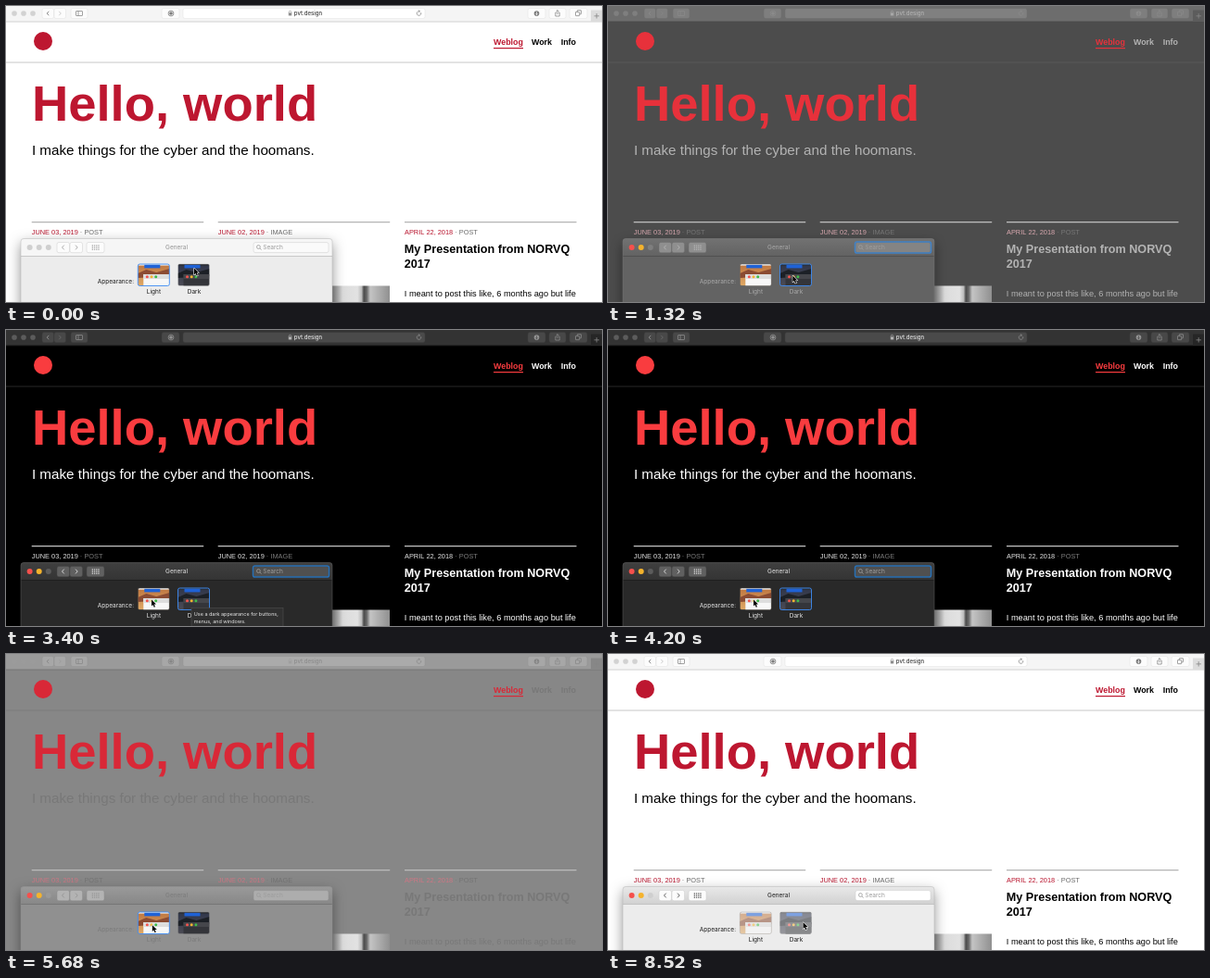
Recreate the animation shown at these times as an HTML page with a canvas. Size 643x320 px, loop 8.56 s.

```html
<!DOCTYPE html>
<html lang="en">
<head>
<meta charset="utf-8">
<title>Light and dark appearance</title>
<style>
html, body { margin: 0; width: 100%; height: 100%; overflow: hidden; background: #fff; }
canvas { display: block; width: 643px; height: 320px; }
</style>
</head>
<body>
<canvas id="stage"></canvas>
<script>
const W = 643, H = 320, LOOP = 8560;
const canvas = document.getElementById('stage');
const ratio = window.devicePixelRatio || 1;
canvas.width = W * ratio;
canvas.height = H * ratio;
const g = canvas.getContext('2d');

const SANS = '"Liberation Sans", Arial, sans-serif';
const UI = 'Inter, Roboto, sans-serif';

let dark = 0; // 0 = light, 1 = dark

const clamp = v => Math.max(0, Math.min(1, v));
const ramp = (t, from, len) => clamp((t - from) / len);
const ease = u => u * u * (3 - 2 * u);
const within = (t, a, b) => t >= a && t < b;

const rgb = hex => [1, 3, 5].map(i => parseInt(hex.slice(i, i + 2), 16));
function mix(a, b) {
  const p = rgb(a), q = rgb(b);
  return `rgb(${p.map((v, i) => Math.round(v + (q[i] - v) * dark)).join(',')})`;
}

function rect(x, y, w, h, fill) {
  g.fillStyle = fill;
  g.fillRect(x, y, w, h);
}
function round(x, y, w, h, r, fill, line, lw = 0.5) {
  g.beginPath();
  g.roundRect(x, y, w, h, r);
  if (fill) { g.fillStyle = fill; g.fill(); }
  if (line) { g.strokeStyle = line; g.lineWidth = lw; g.stroke(); }
}
function disc(x, y, r, fill) {
  g.fillStyle = fill;
  g.beginPath();
  g.arc(x, y, r, 0, 7);
  g.fill();
}
function ring(x, y, r, color) {
  g.strokeStyle = color;
  g.lineWidth = 0.8;
  g.beginPath();
  g.arc(x, y, r, 0, 7);
  g.stroke();
}
function path(color, lw, ...pts) {
  g.strokeStyle = color;
  g.lineWidth = lw;
  g.beginPath();
  for (let i = 0; i < pts.length; i += 2) g.lineTo(pts[i], pts[i + 1]);
  g.stroke();
}
function text(str, x, y, size, fill, weight = 400, font = SANS, align = 'left') {
  g.font = `${weight} ${size}px ${font}`;
  g.textAlign = align;
  g.fillStyle = fill;
  g.fillText(str, x, y);
}
function vertical(y0, y1, a, b) {
  const fill = g.createLinearGradient(0, y0, 0, y1);
  fill.addColorStop(0, a);
  fill.addColorStop(1, b);
  return fill;
}

function toolbar() {
  const icon = mix('#7c7c7c', '#929292');
  const face = mix('#fcfcfc', '#484848');
  const edge = mix('#e0e0e0', '#3c3c3c');
  rect(0, 0, W, 17, mix('#f5f5f5', '#333333'));
  rect(0, 16.5, W, 1, mix('#d2d2d2', '#111111'));
  for (const x of [9, 19, 29]) disc(x, 8, 2.8, mix('#d2d2d2', '#5c5c5c'));
  for (const [x, w] of [[39, 12.5], [52, 12.5], [70, 18], [168, 19], [563, 19], [586, 18], [608, 19]])
    round(x, 2.5, w, 11, 2, face, edge);
  path(icon, 0.9, 46.3, 5.8, 44.2, 8, 46.3, 10.2);
  path(mix('#c8c8c8', '#686868'), 0.9, 57.2, 5.8, 59.3, 8, 57.2, 10.2);
  round(75.5, 5.5, 7, 5, 0.5, null, icon, 0.7);
  path(icon, 0.7, 78, 5.5, 78, 10.5);
  ring(178, 8, 2.9, icon);
  disc(178, 8, 1.8, icon);

  round(191, 2.5, 261, 11, 2, mix('#ffffff', '#4a4a4a'), edge);
  const lock = mix('#8c8c8c', '#b4b4b4');
  rect(304.8, 7.4, 3.4, 3, lock);
  round(305.3, 5.3, 2.4, 3.5, 1.2, null, lock, 0.6);
  text('pvt.design', 310.8, 10.4, 6, mix('#3c3c3c', '#e4e4e4'), 500, UI);
  g.strokeStyle = icon;
  g.lineWidth = 0.7;
  g.beginPath();
  g.arc(445.5, 8, 2.3, -0.4, 4.9);
  g.stroke();
  path(icon, 0.7, 445, 4.6, 446.7, 5.7, 445.2, 7);

  disc(572.5, 8, 2.8, icon);
  path(face, 0.7, 572.5, 6.3, 572.5, 9.6);
  path(face, 0.7, 571.3, 8.4, 572.5, 9.6, 573.7, 8.4);
  path(icon, 0.7, 593.8, 7, 592.8, 7, 592.8, 11, 597.2, 11, 597.2, 7, 596.2, 7);
  path(icon, 0.7, 595, 9, 595, 4.5);
  path(icon, 0.7, 593.7, 5.8, 595, 4.5, 596.3, 5.8);
  round(616.3, 4.6, 4.2, 4.2, 0.4, null, icon, 0.7);
  round(614.5, 6.4, 4.2, 4.2, 0.4, face, icon, 0.7);
  rect(631, 4.5, 12, 12.5, mix('#dcdcdc', '#262626'));
  path(icon, 0.7, 634.5, 10.8, 640, 10.8);
  path(icon, 0.7, 637.2, 8, 637.2, 13.5);
}

function meta(x, date, kind) {
  rect(x, 233, 185.5, 1.3, mix('#b6b6b6', '#bebebe'));
  text(date, x, 246.5, 7.4, mix('#b9162f', '#e4e4e4'));
  const end = x + g.measureText(date + ' ').width;
  text('· ' + kind, end, 246.5, 7.4, mix('#6c6c6c', '#7c7c7c'));
}

function photo() {
  const tones = g.createLinearGradient(352, 0, 414, 0);
  const stops = [[0, '#8c8c8c'], [0.12, '#bcbcbc'], [0.18, '#dcdcdc'], [0.44, '#e2e2e2'],
    [0.51, '#bcbcbc'], [0.55, '#4a4a4a'], [0.6, '#686868'], [0.66, '#c4c4c4'], [1, '#909090']];
  for (const [at, tone] of stops) tones.addColorStop(at, tone);
  rect(229, 302.5, 185, 18, tones);
}

function page() {
  const ink = mix('#000000', '#ffffff');
  const red = mix('#bd1730', '#f93c3f');
  rect(0, 17, W, H, mix('#ffffff', '#000000'));
  toolbar();
  disc(40, 38, 10, red);
  text('Weblog', 526, 41.6, 8.87, red, 700);
  text('Work', 567, 41.6, 8.87, ink, 700);
  text('Info', 598.7, 41.6, 8.87, ink, 700);
  rect(526, 45, 32, 1.2, red);
  rect(0, 60.5, W, 1, mix('#c8c8c8', '#292929'));
  text('Hello, world', 27.9, 124, 54.4, red, 700);
  text('I make things for the cyber and the hoomans.', 27.9, 161, 15.2, ink);
  meta(27.7, 'JUNE 03, 2019', 'POST');
  meta(228.7, 'JUNE 02, 2019', 'IMAGE');
  meta(430, 'APRIL 22, 2018', 'POST');
  text('My Presentation from NORVQ', 429.8, 267, 12.62, ink, 700);
  text('2017', 429.8, 283, 12.62, ink, 700);
  text('I meant to post this like, 6 months ago but life', 429.8, 313.5, 9.22, ink);
  photo();
}

function thumb(x, night, chosen, pressed, body) {
  const y = 279, w = 34, h = 23.5;
  g.save();
  g.beginPath();
  g.roundRect(x, y, w, h, 2);
  g.clip();
  rect(x, y, w, h, night ? vertical(y, y + h, '#30364a', '#4b4b54') : vertical(y, y + h, '#bd7540', '#e0a965'));
  g.fillStyle = night ? '#1c2026' : '#8b4b32';
  g.beginPath();
  g.moveTo(x, y + 10);
  g.lineTo(x + 9, y + 6);
  g.lineTo(x + 20, y + 9);
  g.lineTo(x + w, y + 5);
  g.lineTo(x + w, y + 13);
  g.lineTo(x, y + 15);
  g.fill();
  rect(x, y, w, 1.6, night ? '#292b30' : '#eeeeee');
  rect(x + 7, y + 0.8, 17, 3.6, '#1f62d6');
  rect(x + 6, y + 11, 28, 13, night ? '#34353a' : '#f7f7f7');
  rect(x + 6, y + 11, 28, 5, night ? '#45464b' : '#dddddd');
  ['#f4544e', '#f3b431', '#3fbb4a'].forEach((c, i) => disc(x + 10 + i * 4.7, y + 13.7, 1.5, c));
  if (pressed) {
    g.globalAlpha = 0.46;
    rect(x, y, w, h, body);
    g.globalAlpha = 1;
  }
  g.restore();
  const ringed = chosen && !pressed;
  round(x, y, w, h, 2, null, ringed ? '#3e8df5' : mix('#a8a8a8', '#414141'), ringed ? 0.9 : 0.5);
}

function settings(t) {
  const active = t >= 520;
  const focus = within(t, 620, 4860);
  const pressed = within(t, 540, 860) || within(t, 4860, 5260) || t >= 8280;
  const body = mix('#ececec', '#292929');
  const ink = mix('#1c1c1c', '#e6e6e6');
  const title = active ? ink : '#929292';

  g.save();
  g.shadowColor = 'rgba(0,0,0,0.42)';
  g.shadowBlur = 14 * ratio;
  g.shadowOffsetY = 5 * ratio;
  round(16, 251.5, 336, 90, 3, body);
  g.restore();
  const bar = active
    ? vertical(251, 270, mix('#e9e9e9', '#404040'), mix('#d2d2d2', '#343434'))
    : '#f6f6f6';
  round(16, 251.5, 336, 19, [3, 3, 0, 0], bar);
  rect(16, 270, 336, 0.7, mix('#b8b8b8', '#191919'));
  round(16, 251.5, 336, 90, 3, null, mix('#b5b5b5', '#626262'));

  const off = mix('#cfcfcf', '#5c5c5c');
  const lights = active ? ['#f5504c', '#f5b32c', off] : [off, off, off];
  lights.forEach((c, i) => disc(25.6 + i * 10.1, 261, 3, c));

  const face = mix('#fcfcfc', '#606060');
  const edge = mix('#cccccc', '#474747');
  const icon = active ? mix('#555555', '#dedede') : '#a3a3a3';
  for (const [x, w] of [[55, 13.5], [69, 13.5], [87, 19]]) round(x, 255.5, w, 11.2, 2, face, edge);
  path(icon, 0.9, 62.7, 258.6, 60.5, 261, 62.7, 263.4);
  path(icon, 0.9, 75, 258.6, 77.2, 261, 75, 263.4);
  for (let i = 0; i < 12; i++) rect(92.7 + i % 4 * 2.2, 258.4 + Math.floor(i / 4) * 2.1, 1.3, 1.2, icon);
  text('General', 184, 263.4, 6.5, title, 400, UI, 'center');

  round(267, 255.6, 81, 11, 2, active ? mix('#ffffff', '#505050') : '#fafafa', edge);
  if (focus) round(266.5, 255.1, 82, 12, 2.2, null, mix('#79aef0', '#2870b5'), 1.5);
  const hint = mix('#999999', '#a0a0a0');
  ring(272.4, 260.5, 1.9, hint);
  path(hint, 0.8, 273.8, 261.9, 275.5, 263.6);
  text('Search', 277.3, 263.4, 6.5, hint, 400, UI);

  text('Appearance:', 138, 300, 6.5, ink, 400, UI, 'right');
  const night = within(t, 860, 5260);
  thumb(142.3, false, !night, pressed, body);
  thumb(185.5, true, night, pressed, body);
  text('Light', 159.4, 311, 6.5, ink, 400, UI, 'center');
  text('Dark', 203, 311, 6.5, ink, 400, UI, 'center');
}

function tooltip(t) {
  const alpha = ramp(t, 2500, 120) * (1 - ramp(t, 3560, 240));
  if (!alpha) return;
  g.globalAlpha = alpha;
  rect(200, 300.5, 99, 20, '#303030');
  g.strokeStyle = '#555555';
  g.lineWidth = 0.5;
  g.strokeRect(200, 300.5, 99, 20);
  text('Use a dark appearance for buttons,', 202.8, 308.6, 5.45, '#e8e8e8', 400, UI);
  text('menus, and windows.', 202.8, 316.6, 5.45, '#e8e8e8', 400, UI);
  g.globalAlpha = 1;
}

// time, x, y
const moves = [[0, 203, 283.5], [420, 199.3, 291.5], [2650, 199.3, 291.5], [3150, 157, 291.5], [4200, 157, 291.5],
  [4600, 158, 293], [7250, 157.5, 293], [7950, 210.5, 290], [LOOP, 210.5, 290]];

function cursor(t) {
  const i = moves.findIndex(m => m[0] > t);
  const a = moves[i - 1], b = moves[i];
  const u = ease((t - a[0]) / (b[0] - a[0]));
  g.save();
  g.translate(a[1] + (b[1] - a[1]) * u, a[2] + (b[2] - a[2]) * u);
  g.scale(0.88, 0.88);
  g.beginPath();
  for (const [x, y] of [[0, 0], [0, 8], [1.8, 6.3], [3.1, 9.3], [4.5, 8.7], [3.2, 5.8], [5.7, 5.7]]) g.lineTo(x, y);
  g.closePath();
  g.lineJoin = 'round';
  g.strokeStyle = '#fff';
  g.lineWidth = 1.2;
  g.stroke();
  g.fillStyle = '#000';
  g.fill();
  g.restore();
}

function draw(now) {
  const t = now % LOOP;
  dark = ramp(t, 928, 560) - ramp(t, 5384, 560);
  g.setTransform(ratio, 0, 0, ratio, 0, 0);
  page();
  settings(t);
  tooltip(t);
  cursor(t);
}

const start = performance.now();
function tick() {
  draw(performance.now() - start);
  requestAnimationFrame(tick);
}
tick();
</script>
</body>
</html>
```
